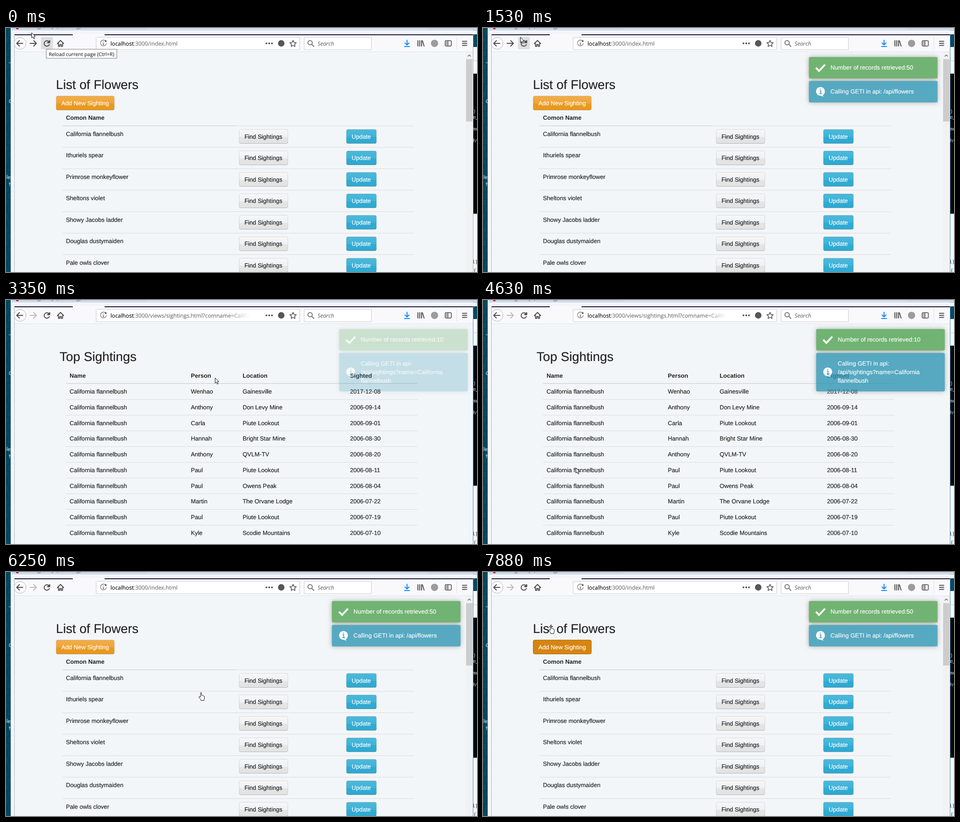
An HTML page for the animation above (8000 ms loop, 1037 by 540 pixels).

```html
<!DOCTYPE html>
<html lang="en">
<head>
<meta charset="utf-8">
<title>List of Flowers</title>
<style>
html, body { margin: 0; width: 100%; height: 100%; overflow: hidden; background: #f3f6f8; }
svg { display: block; }
text {
  font: 13.16px "Liberation Sans", Arial, sans-serif; white-space: pre; text-rendering: geometricPrecision;
  color: #222; fill: currentColor; stroke: currentColor; stroke-width: .2px;
}
.h1 { font-size: 28.2px; }
.b { font-weight: bold; stroke: none; }
.w { color: #fff; }
.ui { font-family: "Open Sans", "Noto Sans", sans-serif; font-size: 12.25px; color: #75757a; }
.tip { font-size: 11px; color: #333; }
.mono { font: 11px "Noto Sans Mono", monospace; color: #b8b8b8; }
.icon { fill: none; stroke: #4a4a4f; stroke-width: 2; stroke-linecap: round; stroke-linejoin: round; }
.toast { filter: drop-shadow(0 0 5.5px #999); }
.line { stroke: #d9dcde; }
.head { stroke: #d2d5d8; stroke-width: 1.6; }
</style>
</head>
<body>
<svg width="1037" height="540" viewBox="0 0 1037 540" xmlns="http://www.w3.org/2000/svg">
  <defs>
    <linearGradient id="grey" x2="0" y2="1">
      <stop stop-color="#f6f7f9"/><stop offset=".52" stop-color="#eff1f2"/>
      <stop offset=".56" stop-color="#e4e5e5"/><stop offset="1" stop-color="#e2e2e3"/>
    </linearGradient>
    <linearGradient id="blue" x2="0" y2="1">
      <stop stop-color="#4db8da"/><stop offset=".52" stop-color="#3fb3d8"/>
      <stop offset=".56" stop-color="#30abd3"/><stop offset="1" stop-color="#2fa9d1"/>
    </linearGradient>
    <linearGradient id="amber" x2="0" y2="1">
      <stop stop-color="#f2ae4b"/><stop offset=".52" stop-color="#efa436"/>
      <stop offset=".56" stop-color="#eb9a20"/><stop offset="1" stop-color="#e9971b"/>
    </linearGradient>
    <linearGradient id="rim" x2="0" y2="1">
      <stop offset=".85" stop-opacity=".12"/><stop offset="1" stop-opacity=".24"/>
    </linearGradient>
    <linearGradient id="fade"><stop stop-color="#fff" stop-opacity="0"/><stop offset="1" stop-color="#fff"/></linearGradient>
  </defs>

  <g id="desktop"></g>

  <rect x="10" width="1018" height="540" fill="#f5f7f9"/>
  <rect x="13" width="1024" height="5.5" fill="#cbd8e7"/>
  <rect x="308" width="622" height="5.5" fill="#d2ddea"/>
  <rect x="13" y="5.5" width="1024" height="8.5" fill="#f4f5f8"/>
  <circle cx="25" cy="0" r="3" fill="#d02030"/>
  <text class="ui" x="36" y="0">Testing shop (Running)</text>
  <path d="M10.5 0V540" stroke="#9fb4be"/>
  <path d="M18.5 14V540" stroke="#a9b2b9"/>

  <g id="page">
    <rect x="19" y="52" width="1009" height="488" fill="#f3f6f8"/>
    <rect id="blank" x="68" y="52" width="960" height="488" fill="#fafbfd"/>
    <g id="list"></g>
    <g id="sights"></g>
    <g id="bar">
      <rect x="1012" y="53" width="16" height="487" fill="#f1f2f4"/>
      <rect x="1013" y="69" width="14" height="138" fill="#cdcdcd"/>
      <path class="icon" style="stroke:#606060;stroke-width:1.4" d="M1017 62.5l3-3 3 3"/>
    </g>
    <g id="toasts"></g>
  </g>

  <rect x="19" y="14" width="1009" height="38.5" fill="#f9f9fb"/>
  <path d="M19 52.5H1028" stroke="#e1e3e7"/>
  <path d="M19 15H147M217 15H1028" stroke="#12123a" stroke-width="2"/>
  <rect x="147" y="13" width="70" height="4" fill="#f9f9fb"/>
  <path id="edge" d="M1028.5 14V540"/>
  <circle cx="31" cy="34" r="13" fill="#fcfcfd" stroke="#b5b5ba"/>
  <path class="icon" d="M37 34H23.5M29.5 28L23.5 34L29.5 40"/>
  <path class="icon" id="next" d="M53 34H66.5M61 28L67 34L61 40"/>
  <rect id="hot" x="77" y="20" width="26" height="27" rx="2" fill="#dedee0"/>
  <path class="icon" id="reload" d="M95 31A6 6 0 1 0 95.6 36.5M96.3 28V32.5H91.5Z"/>
  <path class="icon" id="stop" d="M85 29L95 39M95 29L85 39"/>
  <path class="icon" id="slash" style="stroke-width:1.5" d="M85 29L95 38.5"/>
  <path class="icon" id="arc" style="stroke:#c9c9cd;stroke-width:1.5" d="M86 29.5A6 6 0 0 1 94 38.5"/>
  <path class="icon" d="M113 34.5L120 27.5L127 34.5M115.5 34V40.5H118.5V36.5H121.5V40.5H124.5V34"/>
  <g fill="#fff" stroke="#c9c9cf"><rect x="198.5" y="20.5" width="448" height="27.5" rx="1"/><rect x="656.5" y="20.5" width="148" height="27.5" rx="1"/></g>
  <g fill="none" stroke="#68686d" stroke-width="1.2"><path d="M219 28.5A6.5 6.5 0 1 0 221 34"/><path d="M214.5 33V38M214.5 30V31.2" stroke-width="1.8"/></g>
  <circle cx="219.5" cy="29" r="2" fill="#55555a"/>
  <text class="ui" id="url" x="230" y="38.7"></text>
  <rect x="490" y="22" width="47" height="24" fill="url(#fade)"/>
  <rect x="537" y="22" width="30" height="24" fill="#fff"/>
  <g fill="#55555a">
    <circle cx="573.5" cy="34" r="2"/><circle cx="579.5" cy="34" r="2"/><circle cx="585.5" cy="34" r="2"/>
    <circle cx="606" cy="34" r="7.2"/>
  </g>
  <path class="icon" style="stroke-width:1.5" d="M632 27.3l2.1 4.6 5 .6-3.7 3.4 1 5-4.4-2.5-4.4 2.5 1-5-3.7-3.4 5-.6z"/>
  <g class="icon" style="stroke:#77777b"><circle cx="669.5" cy="32.5" r="4.8"/><path d="M673.3 36.3L678 41"/></g>
  <text class="ui" x="686" y="38.7" style="font-style:italic">Search</text>
  <path class="icon" style="stroke:#0a84ff" d="M883 27V37M878.5 33L883 37.5L887.5 33M877.5 41H888.5"/>
  <path class="icon" d="M907 28V40M911 28V40M915 28V40M917 28.5L920.5 40"/>
  <circle cx="943.5" cy="34" r="8" fill="#9c9ca0"/>
  <g class="icon" style="stroke-width:1.6"><rect x="967" y="28" width="13.5" height="12" rx="2"/><path d="M973 28V40M969.3 31H970.7M969.3 34H970.7M969.3 37H970.7"/></g>
  <path d="M992.5 21V47" stroke="#dcdce0"/>
  <path class="icon" d="M1005 29.5H1014.5M1005 34H1014.5M1005 38.5H1014.5"/>

  <g id="tip">
    <rect x="88.5" y="47" width="155.5" height="20" fill="#fff" stroke="#777"/>
    <text class="ui tip" x="94" y="61.8">Reload current page (Ctrl+R)</text>
  </g>
  <g id="cursor" stroke="#111" fill="#fff" stroke-linejoin="round">
    <path id="arrow" d="M.5 .5V12L3.2 9.6L5.2 14.2L7.2 13.3L5.2 8.9H8.7Z"/>
    <path id="hand" d="M4.2 10.8V2Q4.2 .6 5.4 .6T6.6 2V7Q8.7 6 9 7.7Q11 7 11.2 8.6Q13 8.2 13 10V13Q13 15 11.8 16.5V18.4H5.2V16.8Q3.5 14.6 .8 11.2Q.5 9.7 2 9.6Z"/>
  </g>
</svg>
<script>
const $ = id => document.getElementById(id);
const LOOP = 8000;

const text = (x, mid, str, cls = "") => `<text class="${cls}" x="${x}" y="${mid + 4.7}">${str}</text>`;
const rule = (x1, x2, y, cls = "line") => `<path class="${cls}" d="M${x1} ${y}H${x2}"/>`;

// Buttons
const looks = {
  grey: { hover: "#e2e3e4", down: "#dfe0e1", rim: "#a2a4a6" },
  blue: { hover: "#2fa6ce", down: "#2a97bc", rim: "#22809f" },
  amber: { hover: "#e9961b", down: "#d68512", rim: "#a9690e" }
};
const buttons = [];
function button(x, y, w, look, label) {
  buttons.push({ x, y, w, look });
  return `<rect class="btn" x="${x + .5}" y="${y + .5}" width="${w - 1}" height="31" rx="3.5"/>` +
    text(x + 12, y + 16, label, look === "grey" ? "" : "w");
}

// Pages
const flowers = ["California flannelbush", "Ithuriels spear", "Primrose monkeyflower", "Sheltons violet",
  "Showy Jacobs ladder", "Douglas dustymaiden", "Pale owls clover"];
const addButton = button(110, 150, 129, "amber", "Add New Sighting");
const flowerRows = flowers.map((name, i) => {
  const y = 47.5 * i;
  return (i ? rule(124, 898, 216.5 + y) : "") + text(132, 234 + y, name) +
    button(513, 224 + y, 108, "grey", "Find Sightings") + button(749, 224 + y, 67, "blue", "Update");
}).join("");
$("list").innerHTML = text(110, 130.2, "List of Flowers", "h1") + addButton +
  text(132, 198.5, "Comon Name", "b") + rule(124, 505, 216.5, "head") + rule(505, 898, 216.5) +
  `<g id="rows">${flowerRows}</g>`;

const sightings = `Wenhao,Gainesville,2017-12-08
Anthony,Don Levy Mine,2006-09-14
Carla,Piute Lookout,2006-09-01
Hannah,Bright Star Mine,2006-08-30
Anthony,QVLM-TV,2006-08-20
Paul,Piute Lookout,2006-08-11
Paul,Owens Peak,2006-08-04
Martin,The Orvane Lodge,2006-07-22
Paul,Piute Lookout,2006-07-19
Kyle,Scodie Mountains,2006-07-10`.split("\n").map(row => [flowers[0], ...row.split(",")]);
const columns = [140, 407, 521, 757.5];
const record = (cells, mid, cls) => cells.map((cell, i) => text(columns[i], mid, cell, cls)).join("");
$("sights").innerHTML = text(118, 130.2, "Top Sightings", "h1") +
  record(["Name", "Person", "Location", "Sighted"], 167, "b") + rule(132, 906, 184.7, "head") +
  `<g id="records">${sightings.map((cells, i) =>
    (i ? rule(132, 906, 185.5 + 34.75 * i) : "") + record(cells, 202.3 + 34.75 * i)).join("")}</g>`;

// Toasts
const tick = y => `<path d="M16 ${y}l7 7L36 ${y - 7}" fill="none" stroke="#fff" stroke-width="4"/>`;
const info = y => `<circle cx="26" cy="${y}" r="9.8" fill="#fff"/><path d="M24 ${y + 8}l8 4-1-7z" fill="#fff"/>
  <path d="M24 ${y - 1.5}h2.5v6M23.5 ${y + 5}h6M26 ${y - 6}v2" fill="none" stroke="#2f96b4" stroke-width="2"/>`;
function toasts(x, count, lines) {
  const h = 28.7 + 18.8 * lines.length;
  return `<g class="toast" transform="translate(${x})">
    <rect x=".5" y="64.3" width="283.2" height="47.5" rx="3" fill="#51a351"/>${tick(88)}
    ${text(48, 87.5, "Number of records retrieved:" + count, "w")}
    <rect x=".5" y="117.2" width="283.2" height="${h}" rx="3" fill="#2f96b4"/>${info(116.5 + h / 2)}
    ${lines.map((s, i) => text(48, 140.5 + 18.8 * i, s, "w")).join("")}</g>`;
}
const toastSets = {
  list: toasts(717, 50, ["Calling GETI in api: /api/flowers"]),
  sights: toasts(733, 10, ["Calling GETI in api:", "/api/sightings?name=California", "flannelbush"])
};

// Desktop strips on both sides
let bricks = "";
for (let i = 0; i < 36; i++) bricks += `M0 ${i * 15 + 4}H10M${i % 2 ? 8 : 3} ${i * 15 + 4}v15`;
const mono = (x, y, str, color = "") => `<text class="mono" style="color:${color}" x="${x}" y="${y}">${str}</text>`;
const label = (x, y, str) => `<text class="ui tip" style="color:#dfe8ec" x="${x}" y="${y}">${str}</text>`;
$("desktop").innerHTML = `<rect width="1037" height="540" fill="#064a5f"/>
  <path d="${bricks}" stroke="#053b4f" fill="none"/>
  <rect x="1028" y="42" width="9" height="498" fill="#f7f8fa"/>
  <path d="M1028 72.5H1037" stroke="#c4c8cc"/><rect x="1028" y="101" width="9" height="310" fill="#050505"/>
  <path d="M6 77H10M6 344H10M8 341V350" stroke="#cfdde3"/>` +
  mono(1028, 188, ")") + mono(1028, 201, "e_") + mono(1028, 227, "mo") + mono(1028, 253, "ht") +
  mono(1026, 521, "1)", "#444") + mono(1029, 540, "(1", "#444") + label(1, 334, "le") + label(6, 166, "G");

// Timelines: [start, value...]
const pages = [[0, "list", 1], [520, "list", 0], [1040, "list", 1], [3230, "sights", 0], [3350, "sights", 1],
  [5500, "list", 0], [5620, "list", 1]];
const alphas = [[0, 0], [1040, .2], [1160, .6], [1280, 1], [3230, 0], [3350, .3], [3480, .7], [3600, 1],
  [5500, 0], [5620, .3], [5740, .7], [5860, 1]];
const loaders = [[0, "reload"], [520, "stop"], [800, "slash"], [920, "arc"], [1040, "reload"], [3110, "arc"],
  [3350, "reload"], [5500, "stop"], [5620, "arc"], [5740, "reload"]];
// Pointer: [start, x, y, hand]
const moves = [[0, 56, 10], [1530, 82, 20], [1650, 132, 62], [1770, 214, 116], [1890, 294, 163],
  [2340, 372, 184], [2460, 456, 206], [2580, 548, 233, 1], [2720, 546, 234, 1], [2840, 502, 206, 1], [2960, 456, 175, 1],
  [3110, 459, 176, 1], [3350, 460, 172], [3860, 446, 148], [3980, 400, 128], [4100, 334, 118], [4220, 267, 115],
  [4360, 246, 168], [4480, 227, 238], [4630, 204, 371], [4750, 172, 400], [4870, 142, 424], [4990, 118, 437],
  [5130, 112, 437], [5250, 107, 437], [5860, 190, 404], [5980, 272, 362],
  [6130, 350, 312], [6250, 424, 266, 1], [6370, 438, 262], [6510, 534, 282, 1], [6630, 598, 322, 1], [6750, 690, 331],
  [6870, 772, 326, 1], [6990, 778, 278, 1], [7120, 752, 183], [7270, 600, 172], [7390, 420, 166], [7510, 260, 163],
  [7630, 186, 160, 1], [7750, 176, 158, 1], [7880, 144, 118, 1]];

const at = (table, t) => table.findLast(step => step[0] <= t).slice(1);
const show = (id, on) => { $(id).style.display = on ? "" : "none"; };
const rects = [...document.querySelectorAll(".btn")];

function paintButtons(t, x, y, hand) {
  buttons.forEach((b, i) => {
    const look = looks[b.look];
    const down = i === 0 ? t >= 7750 : i === 1 && t >= 2720 && t < 3230;
    const over = hand && x + 5 > b.x && x + 5 < b.x + b.w && y > b.y && y < b.y + 32;
    rects[i].setAttribute("fill", down ? look.down : over ? look.hover : `url(#${b.look})`);
    rects[i].setAttribute("stroke", down ? look.rim : "url(#rim)");
  });
}

let toastPage = "";
function draw(t) {
  const [page, full] = at(pages, t), [alpha] = at(alphas, t), [loader] = at(loaders, t);
  const [x, y, hand] = at(moves, t);
  const onList = page === "list";
  show("list", onList);
  show("sights", !onList);
  show("rows", full);
  show("records", full);
  show("blank", !full);
  show("bar", onList && full);
  $("list").setAttribute("transform", `translate(${full ? 0 : 8})`);

  if (toastPage !== page) $("toasts").innerHTML = toastSets[toastPage = page];
  $("toasts").setAttribute("opacity", alpha * .8);

  for (const id of ["reload", "stop", "slash", "arc"]) show(id, id === loader);
  show("hot", t < 1650);
  show("tip", t < 520);
  $("next").style.stroke = t < 3110 ? "" : "#bcbcc0";
  $("edge").setAttribute("stroke", t < 520 ? "#a9b2b9" : "#3c8fd0");
  const path = t < 3110 || t >= 5500 ? "/index.html" : "/views/sightings.html?comname=Califo";
  $("url").innerHTML = `<tspan style="color:#18181b">localhost</tspan>:3000${path}`;

  $("cursor").setAttribute("transform", `translate(${x} ${y})`);
  show("arrow", !hand);
  show("hand", hand);
  paintButtons(t, x, y, hand);
}

const start = performance.now();
function frame() {
  draw((performance.now() - start) % LOOP);
  requestAnimationFrame(frame);
}
frame();
</script>
</body>
</html>
```
